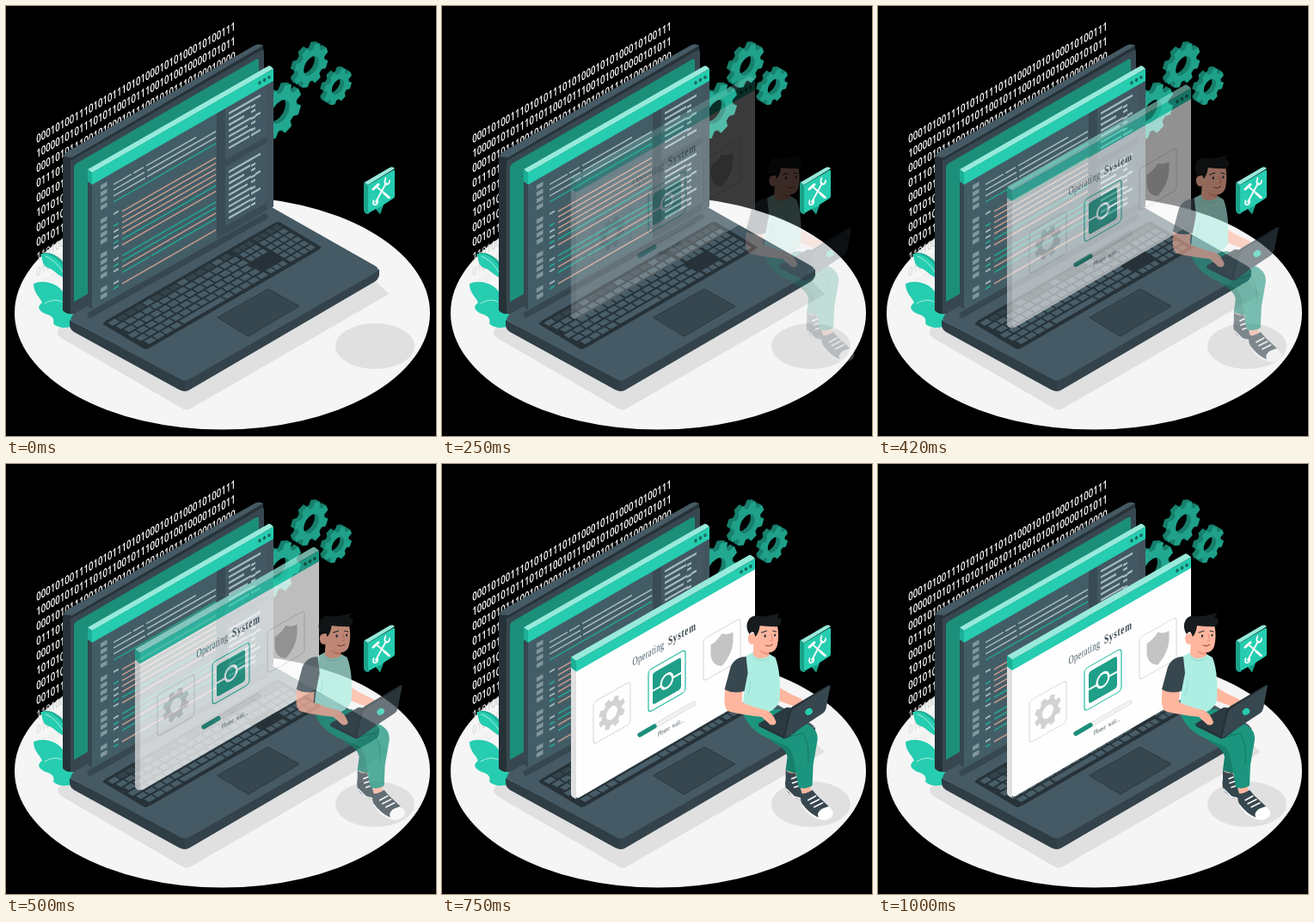
An HTML page with a canvas that plays this animation: 500x500 px, repeating every 1.04 s.

```html
<!DOCTYPE html>
<html lang="en">
<head>
<meta charset="utf-8">
<title>Operating System</title>
<style>
html, body { margin: 0; width: 100%; height: 100%; overflow: hidden; background: #000; }
canvas { display: block; width: 500px; height: 500px; }
</style>
</head>
<body>
<canvas id="stage" width="500" height="500"></canvas>
<script>
const SIZE = 500, LOOP = 1040, STEPS = 24, SLOPE = 0.572;
const TEAL = '#26cdb0', MINT = '#98eadb', DEEP = '#1b8f7a', SLATE = '#455a64', DARK = '#37474f', NIGHT = '#263238';
const SKIN = '#ffb69e', PALE = '#e0e0e0', WHITE = '#fff';

const stage = document.getElementById('stage').getContext('2d');
let g = stage;

function makeLayer() {
  const c = document.createElement('canvas');
  c.width = c.height = SIZE;
  return c.getContext('2d');
}

function fill(color, d) {
  g.fillStyle = color;
  g.fill(new Path2D(d), 'evenodd');
}

function stroke(color, width, d) {
  g.strokeStyle = color;
  g.lineWidth = width;
  g.lineCap = g.lineJoin = 'round';
  g.stroke(new Path2D(d));
}

function oval(color, x, y, rx, ry, turn = 0) {
  g.fillStyle = color;
  g.beginPath();
  g.ellipse(x, y, rx, ry, turn, 0, Math.PI * 2);
  g.fill();
}

// Upright plane rising to the right, origin at (x, y)
function plane(x, y, draw) {
  g.save();
  g.transform(1, -SLOPE, 0, 1, x, y);
  draw();
  g.restore();
}

function bar(color, x, y, w, h) {
  plane(x, y, () => { g.fillStyle = color; g.fillRect(0, -h / 2, w, h); });
}

function text(str, x, y, font, color, squeeze, spacing = 0) {
  plane(x, y, () => {
    g.scale(squeeze, 1);
    g.font = font;
    g.letterSpacing = spacing + 'px';
    g.fillStyle = color;
    g.fillText(str, 0, 0);
  });
}

function gearShape(r, hole) {
  const teeth = 8, inner = r * 0.77;
  g.beginPath();
  for (let i = 0; i < teeth; i++) {
    const a = (i + 0.5) * Math.PI * 2 / teeth;
    [[-0.27, inner], [-0.17, r], [0.17, r], [0.27, inner]].forEach(([da, rr]) =>
      g.lineTo(0.866 * rr * Math.cos(a + da), rr * Math.sin(a + da)));
  }
  g.closePath();
  g.moveTo(0.866 * hole, 0);
  g.ellipse(0, 0, 0.866 * hole, hole, 0, 0, Math.PI * 2);
  g.fill('evenodd');
}

function gear(x, y, r, front) {
  for (let i = 6; i >= 0; i--) {
    g.fillStyle = i ? '#17806d' : front;
    plane(x - i * 0.8, y - i * 0.45, () => gearShape(r, r * 0.44));
  }
}

function binary() {
  const rows = [
    '000101001110101011101010001010100010100111',
    '100001010111010110010111001010010000101011',
    '000101011100101000101110010101110100010000',
    '01110101', '00010101', '10101010', '00101011', '00101101', '11010010', '01001010', '00101001'
  ];
  const shades = { 8: '#cfcfcf', 9: '#dedede', 10: '#ebebeb' };
  const font = '600 13.5px "Open Sans", Arial, sans-serif';
  rows.forEach((row, i) => text(row, 35.3, 159.7 + i * 17.2, font, shades[i] || WHITE, 0.715));
}

function plants() {
  fill('#1fae95', 'M40 289C50 283 62 292 68 299V316C60 313 56 306 48 304C41 300 44 295 40 289Z');
  fill(TEAL, 'M40 289C50 285 62 295 68 305V316C60 313 56 306 48 304C41 300 44 295 40 289Z');
  stroke('#d4f7f0', 0.8, 'M46 291C54 294 62 302 67 311');
  fill(TEAL, 'M32 323C43 318 59 322 66 332L78 350V372C72 375 59 375 55 369C57 363 53 360 46 358C37 354 36 349 42 345C40 339 32 334 32 323Z');
  stroke('#d4f7f0', 0.8, 'M45 346C53 341 60 341 65 344');
}

function lid() {
  fill(NIGHT, 'M66 179Q66 173 72 169L289 46Q294 43 299 46L300 60L78 184V357Q72 360 66 354Z');
  fill(SLATE, 'M67 175Q68 171 72 169L289 46Q294 43 299 46L77 176Z');
  fill(DARK, 'M75 180L296 52Q300 49 300 54V240L100 362L75 358Z');
  fill(DEEP, 'M79 189Q79 185 82 183L291 62Q294 60 294 65V220L79 344Z');
}

function keyboard() {
  const cap = '#485d67', dim = '#34444c', top = 0.06, h = 0.15;
  const key = (x, row, w, c) => { g.fillStyle = c; g.fillRect(x, top + row * h, w, h - 0.038); };
  g.save();
  g.transform(205, -119, 52, 31, 111, 369);
  g.fillStyle = NIGHT;
  g.beginPath();
  g.roundRect(0, 0, 1, 1, 0.035);
  g.fill();
  for (let r = 0; r < 6; r++) {
    const color = r ? cap : dim;
    for (let c = 0; c < 14; c++) {
      if (r === 5 && c > 3 && c < 9) continue;
      key(0.02 + c * 0.049 + (r % 3) * 0.008, r, 0.041, r || c % 4 ? color : cap);
    }
    if (r === 5) key(0.235, r, 0.235, cap);
    for (let c = 0; c < 3; c++)
      if (r < 3 || r === 5) key(0.727 + c * 0.034, r, 0.028, color);
    for (let c = 0; c < 4; c++) key(0.84 + c * 0.037, r, 0.03, color);
  }
  g.restore();
}

function base() {
  fill('#2f3d45', 'M74 365L208 434V448Q205 448 201 446L79 379Q74 376 74 370Z');
  fill('#34434b', 'M208 434L434 306V313Q433 318 428 321L214 446Q211 448 208 448Z');
  fill(SLATE, 'M76 366Q74 363 79 358L297 234Q302 231 309 234L429 302Q436 306 430 310L213 434Q208 437 203 434Z');
  stroke(DARK, 7, 'M98 359L301 245');
  keyboard();
  fill(DARK, 'M246 362L305 329L341 349L282 384Z');
  stroke('#2b383f', 1, 'M246 362L305 329L341 349L282 384Z');
}

function titleBar(x, y, w, h, d) {
  const run = w - d, x2 = x + d, y2 = y + d * 0.75, right = x + w;
  const backY = y - run * SLOPE, frontY = y2 - run * SLOPE;
  fill(MINT, `M${x} ${y}L${right - d - 1} ${backY + 0.5}Q${right - d + 1} ${backY - 0.5} ${right} ${frontY}L${x2} ${y2}Z`);
  fill('#1bb096', `M${x} ${y}L${x2} ${y2}V${y2 + h}L${x} ${y + h}Z`);
  fill(TEAL, `M${x2} ${y2}L${right} ${frontY}v${h}L${x2} ${y2 + h}Z`);
  [16, 10.5, 5].forEach(k => oval('#176b5d', right - k, frontY + k * SLOPE + h / 2, 1.7, 2.2, 0.4));
}

function codeWindow() {
  fill(DARK, 'M95 203L100 206V353L95 349Z');
  fill('#435d67', 'M100 207L311 87V233L100 353Z');
  fill('#394b54', 'M245 125L311 87V233L245 271Z');
  fill('#435862', 'M255 119L303 91V152L255 179ZM255 187L303 159V229L255 256Z');
  fill('#42555e', 'M303 91L311 87V233L303 237Z');
  titleBar(95, 190, 216, 14, 5);

  const gray = '#a9bdc1', salmon = '#c59a8c', green = '#23a78f', dim = '#81969c';
  [211, 219, 227, 235, 251, 259, 267, 275, 291, 299, 307, 315, 331, 339].forEach(y => bar(dim, 110, y, 7.5, 5));
  [242, 256, 263, 270, 276, 282, 296, 303, 309, 323, 329].forEach((y, i) => bar(i % 3 === 1 ? green : gray, 125, y, 6, 2));

  const line = (c, y, ...spans) => {
    for (let i = 0; i < spans.length; i += 2)
      bar(c, spans[i], y - (spans[i] - 125) * SLOPE, spans[i + 1] - spans[i], 1.7);
  };
  line(gray, 207.5, 125, 146, 148, 160, 163, 221);
  line(gray, 214, 125, 161, 164, 244);
  line(gray, 221, 125, 162, 164, 244);
  line(green, 228, 125, 244);
  [[244.5, salmon], [251, salmon], [257.5, salmon], [264, salmon], [270.5, salmon], [277, green], [283.5, salmon],
    [296, green], [302.5, green], [309, salmon]].forEach(([y, c]) => line(c, y, 135, 244));
  line(green, 315.5, 135, 167, 169, 244);
  line(salmon, 328.5, 135, 244);

  const side = (y, n) => {
    for (let i = 0; i < n; i++) {
      const w = [26, 25, 18, 26, 22, 27, 24][i % 7], yy = y + i * 6.7;
      bar('#a3babf', 259, yy, w, 2.6);
      bar('#a3babf', 285, yy - 26 * SLOPE + (i % 2 ? 1 : 0), 5, 2.6);
      if (i % 3 === 0) bar('#a3babf', 290, yy - 31 * SLOPE, 6, 2.6);
    }
  };
  side(125, 7);
  side(193, 9);
}

function bubble() {
  fill('#1ba28a', 'M416 207Q416 205 418 204L422 208V242Q416 242 416 237Z');
  fill(MINT, 'M417 205L446 188Q450 186 452 189L421 208Z');
  fill(TEAL, 'M421 210Q421 208 423 207L450 191Q452 190 452 192V221Q452 223 450 224L439 231L435 242L430 236L423 240Q421 241 421 238Z');
  fill('#1ba28a', 'M430 236L435 242L439 231L437 233Z');
  stroke(WHITE, 1.8, 'M430 228L442 206M432 211L446 223');
  stroke(WHITE, 3, 'M427 213L433 207.5M440 218L445 222.5');
  stroke(WHITE, 1.8, 'M441.5 200Q439 206 442 207.5Q446 207.5 446 203M427.5 226Q426 232 430 231Q433 229.5 432 226');
}

function backdrop() {
  g.fillStyle = '#000';
  g.fillRect(0, 0, SIZE, SIZE);
  oval('#f5f5f5', 251.5, 357, 241.5, 135.5);
  binary();
  fill(PALE, 'M62 375L90 362L430 320L445 335L215 468Q210 471 205 468L64 386Q57 381 62 375Z');
  oval(PALE, 429, 395.5, 46, 26.5);
  plants();
  gear(355, 69.5, 23, '#1fa089');
  gear(386, 94, 19, '#1fa089');
  gear(319, 123, 28.5, '#22a890');
  lid();
  base();
  codeWindow();
  bubble();
}

function card(x, y, color, icon) {
  plane(x, y, () => {
    g.strokeStyle = color;
    g.lineWidth = 1.2;
    g.beginPath();
    g.roundRect(-21.5, -24.5, 43, 49, 4);
    g.stroke();
    icon();
  });
}

function panel() {
  fill(PALE, 'M150 235L156 238V388L152 386Q150 385 150 382Z');
  fill('#fefefe', 'M156 238L364 119V267L160 386Q156 388 156 385Z');
  titleBar(150, 223, 214, 12.5, 6);

  const serif = '"Liberation Serif", "Times New Roman", serif';
  text('Operating', 221.5, 233.5, `13.5px ${serif}`, SLATE, 0.64, 0.4);
  text('System', 263, 209.5, `bold 14.5px ${serif}`, DARK, 0.64, 1.1);
  text('Please  wait...', 251, 315.5, `8px ${serif}`, DARK, 0.64, 0.2);

  card(197.5, 288, '#dcdcdc', () => { g.fillStyle = '#d2d2d2'; gearShape(18, 7.5); });
  card(261.5, 251, '#22b99e', () => {
    g.fillStyle = '#1f9f88';
    g.beginPath();
    g.roundRect(-16.5, -18.5, 33, 37, 3);
    g.fill();
    stroke(WHITE, 2.2, 'M-17 2H-8M8 0H17');
    oval(WHITE, 0, 0, 8, 9.2);
    oval('#1f9f88', 0, 0, 5.6, 6.6);
  });
  card(325.5, 214.5, '#dcdcdc', () =>
    fill('#c4c4c4', 'M0 -19Q6 -13 13 -13V-2Q12 12 0 19Q-12 12 -13 -2V-13Q-6 -13 0 -19Z'));

  stroke('#dedede', 5.4, 'M230 313.5L293 277');
  stroke('#f1f1f1', 3.8, 'M230 313.5L293 277');
  stroke(DEEP, 5.2, 'M230 313.5L247 303.5');
}

function shoes() {
  fill(SKIN, 'M403 351L413 354L414 362L405 361ZM418 371L430 370V383L420 385Z');
  fill(DARK, 'M401 356Q406 361 412 359L417 372L421 387Q418 391 412 388L404 382Q399 376 401 366Z');
  stroke(WHITE, 1.5, 'M402 378L411 387L419 389M408 366L413 364M409 371L415 369M411 376L417 374');
  fill(WHITE, 'M419 396L428 407Q437 414 447 414Q458 411 456 404L452 399Z');
  fill(DARK, 'M419 383Q425 384 432 379L438 386L451 398L443 401Q437 405 439 411Q428 406 420 395Q417 389 419 383Z');
  stroke(WHITE, 1.5, 'M427 391L436 386M430 395L440 390M434 399L444 394');
}

function head() {
  fill(SKIN, 'M364 204L363 222Q371 230 382 223L381 213Z');
  fill('#f29a82', 'M370 216Q376 220 382 218L381 222Q373 222 370 216Z');
  fill(SKIN, 'M365 188L391 186Q394 200 391 212Q388 220 380 219Q369 217 365 209Q358 212 357 203Q357 196 365 197Z');
  fill('#171b1d', 'M359 198Q353 189 358 181Q362 175 370 177Q380 178 395 173L391 178Q396 179 396 183Q394 190 388 189Q378 189 371 188Q370 196 366 201L364 196Q361 194 359 198Z');
  oval(NIGHT, 377, 200, 1.2, 1.7);
  oval(NIGHT, 388.5, 199, 1.1, 1.6);
  stroke(NIGHT, 1.1, 'M373 196L379 194M386 194L390 195');
  stroke('#e98670', 0.9, 'M384 198L386 205L383 206');
  stroke('#8d4235', 1, 'M378 211Q382 213 386 210');
}

function man() {
  shoes();
  fill('#17806c', 'M380 310L405 318L416 340L414 359Q408 360 401 356L403 340Q400 329 385 323Z');
  fill('#1c957e', 'M351 288L394 285L427 303Q439 309 438 321L433 350L432 374Q425 379 416 376L411 347Q409 333 403 328L378 318Q356 307 351 288Z');
  stroke('#137361', 0.9, 'M373 306Q397 317 412 313M401 318L421 313Q429 325 427 347');
  fill(SKIN, 'M390 257Q402 266 419 273L425 279L417 283Q401 279 391 274Z');
  fill('#aeeee2', 'M352 225L363 219Q371 228 382 221L389 225Q396 243 394 276Q389 288 373 291Q360 293 350 289L353 263Z');
  stroke('#83d9c8', 0.8, 'M364 225Q371 232 382 226M357 268Q360 262 360 252');
  head();
  fill('#2b3940', 'M369 302L402 283L427 285L400 318Z');
  fill(NIGHT, 'M369 302L400 317V320L370 305Z');
  fill(SKIN, 'M331 260L351 263L350 277Q366 284 378 286Q386 289 390 300Q389 305 383 303L373 294Q353 292 336 288Q327 286 331 260Z');
  stroke('#ee967e', 0.8, 'M376 291L384 298M380 289L388 297');
  fill(DARK, 'M355 224Q342 224 337 236L330 262Q340 268 353 264L357 243Z');
  fill(NIGHT, 'M398 318L405 288Q406 284 409 282L451 257L453 258L447 286L402 319Z');
  fill(DARK, 'M400 319L407 289Q408 286 411 284L453 257L448 284Q447 288 444 290Z');
  oval(TEAL, 428, 288, 4.5, 3.7, -0.6);
}

// Cubic Bezier ease with a small overshoot, solved by bisection
function ease(t) {
  const curve = (a, b, s) => 3 * (1 - s) * (1 - s) * s * a + 3 * (1 - s) * s * s * b + s * s * s;
  let lo = 0, hi = 1;
  for (let i = 0; i < 30; i++) {
    const mid = (lo + hi) / 2;
    if (curve(0.36, 0.5, mid) < t) lo = mid; else hi = mid;
  }
  return curve(-0.01, 1.38, lo);
}

const scene = makeLayer(), overlay = makeLayer();

function show(draw, dx, dy, alpha) {
  g = overlay;
  g.clearRect(0, 0, SIZE, SIZE);
  g.save();
  g.translate(dx, dy);
  draw();
  g.restore();
  stage.globalAlpha = alpha;
  stage.drawImage(overlay.canvas, 0, 0);
  stage.globalAlpha = 1;
}

let last = -1;
function render(now) {
  const t = now % LOOP;
  let k = STEPS;
  while (k > 0 && Math.round(4.16 * k) * 10 > t) k--;
  if (k === last) return;
  last = k;
  const p = ease(k / STEPS), off = 30 * (1 - p);
  const alpha = Math.max(0, Math.min(1, p));
  stage.drawImage(scene.canvas, 0, 0);
  show(panel, 0, -off, alpha);
  show(man, off, 0, alpha);
}

g = scene;
backdrop();

const start = performance.now();
function tick() {
  render(performance.now() - start);
  requestAnimationFrame(tick);
}
tick();
</script>
</body>
</html>
```
